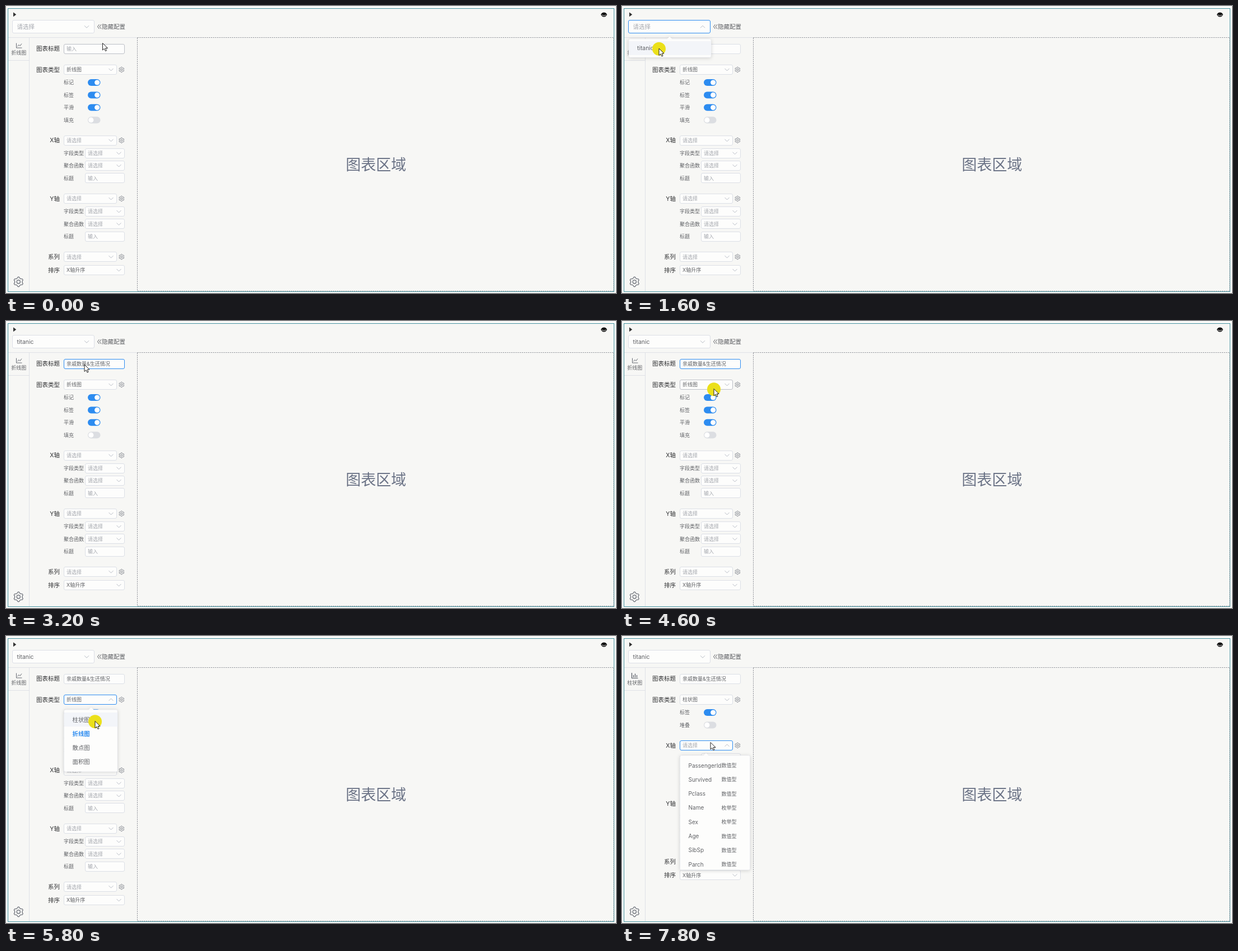
An HTML page for the animation above (8000 ms loop, 1089 px wide and 514 px high).

```html
<!DOCTYPE html>
<html lang="zh-CN">
<head>
<meta charset="utf-8">
<title>图表配置</title>
<style>
html, body { margin: 0; width: 100%; height: 100%; overflow: hidden; background: #fafaf8; }
svg { display: block; width: 1089px; height: 514px; font-family: Inter, "Noto Sans CJK SC", "Noto Sans CJK", sans-serif; }
.shadow { filter: drop-shadow(0 1px 3px rgba(0, 0, 0, .16)); }
</style>
</head>
<body>
<svg id="stage" viewBox="0 0 1089 514"></svg>
<script>
const LOOP = 8000, STEP = 200;
const BLUE = '#2d8cf0', EDGE = '#dcdfe6', HOVER = '#bcbfc6', HINT = '#a3a6ad', INK = '#606266', LABEL = '#303133';

// Pointer stops: [step, x, y]
const stops = [
  [0, 172.5, 66.5], [1, 166, 57], [2, 152, 44], [3, 144, 41], [5, 144, 41],
  [6, 112, 58], [7, 72, 74], [8, 66, 76], [9, 68, 77], [11, 120.5, 76.5],
  [13, 140, 78], [18, 140, 78], [22, 164, 121.5], [24, 164, 121.5],
  [28, 159, 152.5], [32, 159, 152.5], [33, 148, 140.5], [37, 158, 190.5], [40, 158, 190.5]
];
const presses = [8, 13, 23, 29, 37];

const fields = [['PassengerId', 0], ['Survived', 0], ['Pclass', 0], ['Name', 1], ['Sex', 1], ['Age', 0], ['SibSp', 0], ['Parch', 0]];

const text = (x, cy, str, size = 9, fill = INK, extra = '') =>
  `<text x="${x}" y="${cy + size * .37}" font-size="${size}" fill="${fill}" ${extra}>${str}</text>`;
const label = (cy, str) => text(96, cy, str, 10.5, LABEL, 'text-anchor="end"');
const line = (d, stroke, width = 1, extra = '') =>
  `<path d="${d}" fill="none" stroke="${stroke}" stroke-width="${width}" ${extra}/>`;
const chevron = (x, y, turn = 0) =>
  line('M-4 -2L0 2L4 -2', '#b9bdc6', 1, `transform="translate(${x} ${y}) rotate(${turn})"`);

// Edges sit on half pixels so that they stay crisp.
const box = (x, cy, w, h, edge = EDGE) =>
  `<rect x="${x + .5}" y="${Math.round(cy - h / 2 - .5) + .5}" width="${w}" height="${h}" rx="2.5" fill="#fdfdfc" stroke="${edge}"/>`;

function input(x, cy, w, value, edge) {
  return box(x, cy, w, 17, edge) + text(x + 5, cy, value || '输入', 9, value ? INK : HINT);
}

function select(x, cy, w, value, edge, turn) {
  return box(x, cy, w, 17, edge) + text(x + 5, cy, value || '请选择', 9, value ? INK : HINT) +
    chevron(x + w - 9.5, cy, turn);
}

function toggle(cy, name, on) {
  return text(103, cy, name) +
    `<rect x="146" y="${cy - 6}" width="22.5" height="12" rx="6" fill="${on ? BLUE : '#dcdee2'}"/>` +
    `<circle cx="${on ? 162.7 : 151.8}" cy="${cy}" r="4.6" fill="#fff"/>`;
}

function gear(x, y, r, width, color) {
  const points = [];
  for (let i = 0; i < 24; i++) {
    const angle = (i - .5) * Math.PI / 12;
    const radius = i % 4 < 2 ? r : r * .78;
    points.push(`${(x + radius * Math.sin(angle)).toFixed(2)},${(y + radius * Math.cos(angle)).toFixed(2)}`);
  }
  return `<g fill="none" stroke="${color}" stroke-width="${width}" stroke-linejoin="round">
    <polygon points="${points.join(' ')}"/><circle cx="${x}" cy="${y}" r="${r * .36}"/></g>`;
}
const smallGear = cy => gear(206.3, cy, 4.7, .9, '#777b84');

function axis(cy, name, edge, turn) {
  const sub = (i, title, control) => text(103, cy + 23 + i * 22.4, title) + control(141, cy + 23 + i * 22.4, 70);
  return label(cy, name) + select(103, cy, 94, '', edge, turn) + smallGear(cy) +
    sub(0, '字段类型', select) + sub(1, '聚合函数', select) + sub(2, '标题', input);
}

function popup(x, y, w, h, tip, content, grow = 1, opacity = 1) {
  return `<g opacity="${opacity}" transform="translate(0 ${y}) scale(1 ${grow}) translate(0 ${-y})"><g class="shadow">
    <rect x="${x}" y="${y}" width="${w}" height="${h}" rx="2.5" fill="#fdfdfc" stroke="#e8eaf0" stroke-width=".7"/>
    <path d="M${tip - 5} ${y + .5}l5 -4.5l5 4.5z" fill="#fdfdfc"/></g>${content}</g>`;
}

function chartIcon(bar) {
  return bar
    ? line('M17.5 66V75.5H28.5M20.5 74V70M23.5 74V67.5M26.5 74V70', '#555962', 1.2)
    : line('M18.5 66.5V75H28.5M20.5 72.5L23 69.5L25 71.5L28 67.5', '#666a73');
}

function frame() {
  return `<rect x="3.5" y="4.5" width="1082" height="507" fill="#f7f7f5" stroke="#4593a0"/>
    <path d="M13 11.3L18.3 15.3L13 19.3Z" fill="#333"/>
    <path d="M1062 15.5Q1063.5 11.5 1067.5 11.5Q1071.5 11.5 1073 15.5Q1071 19.5 1067.5 19.5Q1064 19.5 1062 15.5Z" fill="#111"/>
    <path d="M1063.5 16Q1067.5 19 1071.5 16" fill="none" stroke="#eee" stroke-width=".9"/>` +
    line('M4 56.5H234M41.5 57V511M4 97.5H41', '#dfe1e6') +
    line('M234.5 56.5H1085V510.5H234.5Z', '#8f9299', 1, 'stroke-dasharray="2.25 1.5"') +
    line('M166.5 33L163.5 37L166.5 41M170 33L167 37L170 41', INK) +
    text(171, 37, '隐藏配置', 10.5) +
    gear(22.3, 494, 8.6, 1.2, '#666a73') +
    text(660.5, 284, '图表区域', 27, '#6b7386', 'text-anchor="middle"');
}

function panel(s) {
  const bar = s >= 30, shift = bar ? -44.7 : 0;
  const named = s >= 14;
  const titleEdge = s >= 13 && s < 24 ? BLUE : s === 0 || (s > 9 && s < 13) ? HOVER : EDGE;
  const typeEdge = s >= 24 && s < 38 ? BLUE : s >= 21 && s < 24 ? HOVER : EDGE;
  const typeTurn = s === 24 ? -135 : s > 24 && s < 30 ? 180 : 0;
  const kind = bar ? '柱状图' : '折线图';
  const options = bar ? [['标签', 1], ['堆叠', 0]] : [['标记', 1], ['标签', 1], ['平滑', 1], ['填充', 0]];
  const xEdge = s >= 38 ? BLUE : s >= 36 ? HOVER : EDGE;
  return chartIcon(bar) + text(9.3, 83.5, kind) +
    label(76.5, '图表标题') + input(103, 76.8, 108, named ? '亲戚数量&amp;生还情况' : '', titleEdge) +
    label(114, '图表类型') + select(103, 114, 94, kind, typeEdge, typeTurn) + smallGear(114) +
    options.map(([name, on], i) => toggle(137 + i * 22.4, name, on)).join('') +
    axis(240.6 + shift, 'X轴', xEdge, s === 38 ? -135 : s > 38 ? 180 : 0) +
    axis(345 + shift, 'Y轴') +
    label(449.2 + shift, '系列') + select(103, 449.2 + shift, 94) + smallGear(449.2 + shift) +
    label(473 + shift, '排序') + select(103, 473 + shift, 108, 'X轴升序');
}

function source(s) {
  const chosen = s >= 9;
  const edge = s >= 5 && s < 12 ? BLUE : s > 2 && s < 5 ? HOVER : EDGE;
  return box(11, 37.2, 146, 23, edge) +
    text(19.5, 37.2, chosen ? 'titanic' : '请选择', 10.5, chosen ? INK : HINT) +
    chevron(144, 37.2, s === 5 ? -135 : s > 5 && s < 9 ? 180 : 0);
}

function popups(s) {
  if (s >= 5 && s < 9) {
    const hover = s > 6 ? '<rect x="12" y="63" width="147" height="25" fill="#f3f5f9"/>' : '';
    return popup(12, 59, 147, 33, 85, hover + text(27, 75.5, 'titanic', 10.4), 1, s === 5 ? .94 : 1);
  }
  if (s >= 24 && s < 31) {
    const items = ['柱状图', '折线图', '散点图', '面积图'].map((name, i) => {
      const picked = i === (s < 30 ? 1 : 0);
      return text(118.5, 149.7 + i * 25.3, name, 10.4, picked ? BLUE : INK, picked ? 'font-weight="700"' : '');
    }).join('');
    const hover = s > 26 ? '<rect x="104" y="137" width="95" height="25.3" fill="#f3f5f9"/>' : '';
    const partial = s === 24 || s === 30;
    return popup(103.5, 132, 95.5, 111, 152, hover + items, partial ? .78 : 1, partial ? .6 : 1);
  }
  if (s >= 38) {
    const rows = fields.map(([name, category], i) => {
      const cy = 231.8 + i * 25.3;
      return text(118.5, cy, name, 10) + text(177.5, cy, category ? '枚举型' : '数值型');
    }).join('');
    return popup(103.5, 214, 125, 205, 150, rows, s === 38 ? .78 : 1, s === 38 ? .7 : 1);
  }
  return '';
}

function pointer(s) {
  const next = stops.findIndex(stop => stop[0] > s);
  const [s0, x0, y0] = stops[next - 1], [s1, x1, y1] = stops[next];
  const p = (s - s0) / (s1 - s0), x = x0 + (x1 - x0) * p, y = y0 + (y1 - y0) * p;
  const halo = presses.includes(s) ? '<circle cy=".7" r="12" fill="#ebe01a"/>' : '';
  return `<g transform="translate(${x} ${y})">${halo}
    <path d="M0 0V12.5L3 9.8L5 14.2L7 13.3L5.1 9H9Z" fill="#fff" stroke="#222" stroke-width="1"/></g>`;
}

const stage = document.getElementById('stage');
let shown = -1;

function render(now) {
  const s = Math.floor(now % LOOP / STEP);
  if (s !== shown) {
    stage.innerHTML = frame() + source(s) + panel(s) + popups(s) + pointer(s);
    shown = s;
  }
}

const start = performance.now();
function tick() {
  render(performance.now() - start);
  requestAnimationFrame(tick);
}
tick();
</script>
</body>
</html>
```
